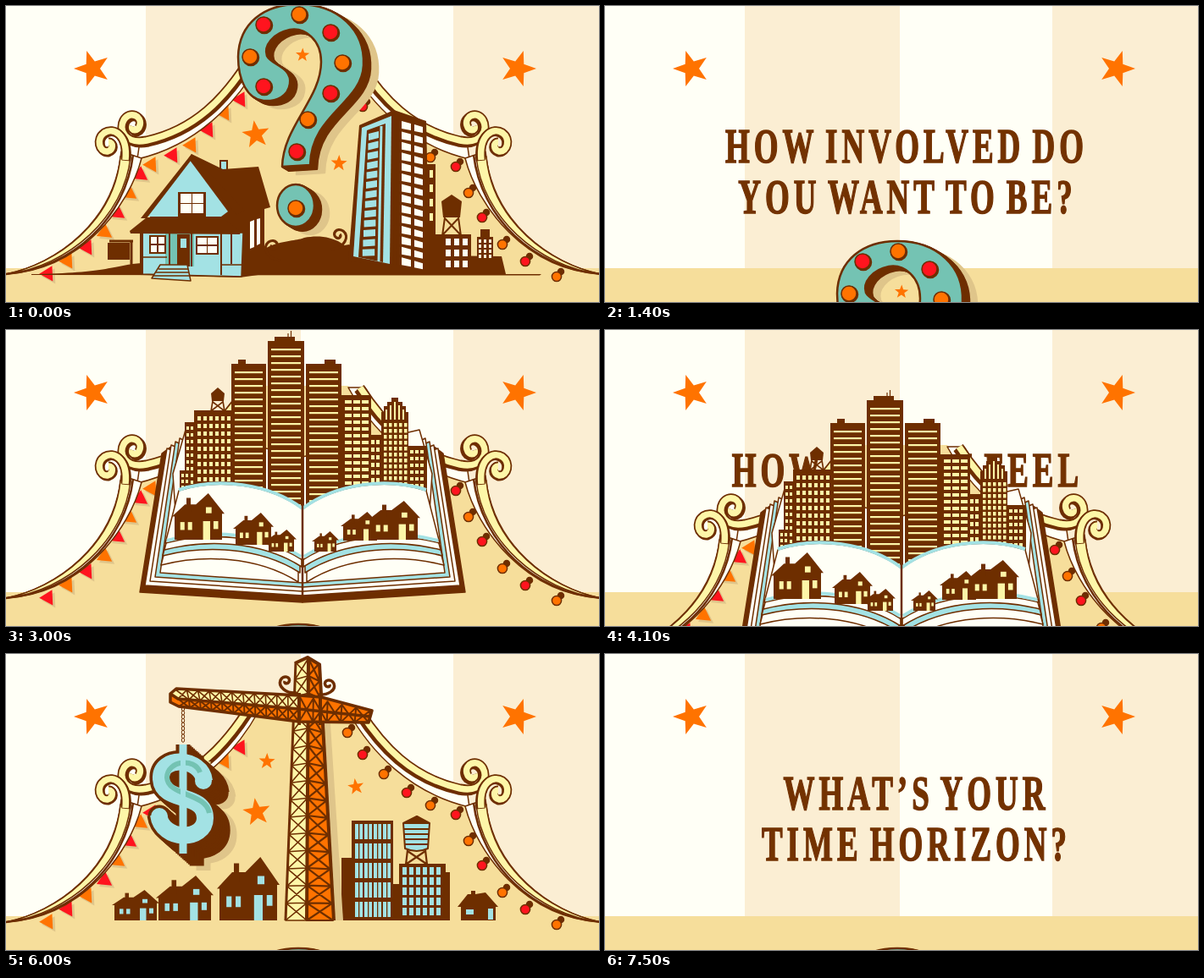
These frames come from a looping animation (700x350 px, 8 s). An HTML page:

```html
<!DOCTYPE html>
<html lang="en">
<head>
<meta charset="utf-8">
<title>Fairground questions</title>
<style>
html, body { margin: 0; width: 100%; height: 100%; overflow: hidden; background: #fffff6; }
svg { display: block; width: 100vw; height: 100vh; }
.scene, .ask { animation: 8s linear infinite; }
#house { animation-name: house; }
#book { animation-name: book; }
#crane { animation-name: crane; }
.ask { opacity: 0; animation-timing-function: step-end;
  font: bold 56px "Liberation Serif", "Noto Serif", serif;
  letter-spacing: 7.6px; word-spacing: -7.6px; text-anchor: middle;
  fill: #733200; stroke: #733200; stroke-width: 1.6; }
#ask1 { animation-name: ask1; }
#ask2 { animation-name: ask2; }
#ask3 { animation-name: ask3; }
/* Scenes drop and rise in hard 100 ms steps of 70 px */
@keyframes house {
  0%, 12.5% { transform: translateY(0); animation-timing-function: steps(5, end); }
  18.75%, 100% { transform: translateY(350px); }
}
@keyframes book {
  0%, 32.5% { transform: translateY(350px); animation-timing-function: steps(5, start); }
  38.75%, 51.25% { transform: translateY(0); animation-timing-function: steps(5, start); }
  57.5%, 100% { transform: translateY(350px); }
}
@keyframes crane {
  0%, 70% { transform: translateY(350px); animation-timing-function: steps(5, start); }
  76.25%, 88.75% { transform: translateY(0); animation-timing-function: steps(5, start); }
  95%, 100% { transform: translateY(350px); }
}
@keyframes ask1 { 0% { opacity: 0; } 13.75% { opacity: 1; } 37.5%, 100% { opacity: 0; } }
@keyframes ask2 { 0% { opacity: 0; } 51.25% { opacity: 1; } 75%, 100% { opacity: 0; } }
@keyframes ask3 { 0% { opacity: 0; } 88.75%, 100% { opacity: 1; } }
</style>
</head>
<body>
<svg id="stage" viewBox="0 0 700 350"></svg>
<script>
const BROWN = '#6e2e00', ORANGE = '#ff7300', RED = '#ff141e', SAND = '#f6de9b', SHADE = '#dfc58a',
      BLUE = '#a3e2e4', TEAL = '#74c3b3', WHITE = '#fffff6', YELLOW = '#fdf6a8', CREAM = '#fbeed3';

const path = (d, fill = BROWN, stroke = 'none', w = 1.5) =>
  `<path d="${d}" fill="${fill}" stroke="${stroke}" stroke-width="${w}" stroke-linejoin="round"/>`;
const line = (d, w = 1.5, c = BROWN) => path(d, 'none', c, w);
const poly = (pts, fill, stroke, w) => path('M' + pts + 'Z', fill, stroke, w);
const rect = (x, y, w, h, fill = BROWN) => `<rect x="${x}" y="${y}" width="${w}" height="${h}" fill="${fill}"/>`;
const disc = (x, y, r, fill = BROWN, ry = r) =>
  `<ellipse cx="${x}" cy="${y}" rx="${r}" ry="${ry}" fill="${fill}" stroke="${BROWN}" stroke-width="1.5"/>`;
const at = (x, y, body, more = '') => `<g transform="translate(${x} ${y}) ${more}">${body}</g>`;
const repeat = (n, fn) => Array.from({ length: n }, (_, i) => fn(i)).join('');
const grid = (x, y, cols, rows, dx, dy, w, h, fill) =>
  repeat(cols, c => repeat(rows, r => rect(x + c * dx, y + r * dy, w, h, fill)));

function star(x, y, r, turn = 180) {
  const pts = repeat(10, i => {
    const a = (turn + i * 36) * Math.PI / 180, k = i % 2 ? r * .41 : r;
    return `${(x + k * Math.cos(a)).toFixed(1)} ${(y + k * Math.sin(a)).toFixed(1)} `;
  });
  return poly(pts, ORANGE);
}

const extrude = (n, dx, dy, shape) =>
  repeat(n, i => at((n - i) * dx, (n - i) * dy, shape));

// Crossed bracing between the edges a-b and c-d
function truss(a, b, c, d, n, w = 1.6) {
  const mix = (p, q, t) => p.map((v, i) => (v + (q[i] - v) * t).toFixed(1)).join(' ');
  return line(repeat(n, i => {
    const s = i / n, t = (i + 1) / n;
    return `M${mix(a, b, s)}L${mix(c, d, t)}L${mix(a, b, t)}L${mix(c, d, s)}`;
  }), w);
}

const curl = (x, y, flip = 1) => at(x, y,
  line('M14 22C-2 20 -8 6 0 0C8 -5 14 4 8 8C4 10 2 6 4 4', 3.2), `scale(${flip} 1)`);

function tentSide() {
  const upper = 'M284 68C258 108 224 146 166 159C140 164 133 146 139 135C146 123 161 130 158 141C156 149 147 148 149 142';
  const lower = 'M141 182C144 152 127 143 116 150C106 157 110 173 120 172C127 170 127 161 121 161';
  return path('M158 160C215 150 255 108 278 68L298 68C272 115 225 165 155 181Z', WHITE, BROWN) +
    path('M0 317C60 305 128 255 136 172L160 180C146 235 90 312 0 317Z', WHITE, BROWN) +
    line('M0 317C80 310 141 250 150 176', 2.5) +
    path('M0 317C60 305 128 255 135 178L147 178C140 248 75 308 0 317Z', YELLOW, BROWN) +
    at(2, 2, line(upper, 11)) + line(upper, 11) + line(upper, 7.5, YELLOW) +
    at(1, 1, line(lower, 11)) + line(lower, 11) + line(lower, 7.5, YELLOW);
}

const flags = [277, 111, 258, 127, 239, 147, 219, 165, 197, 177, 172, 188, 159, 200,
  146, 222, 132, 245, 117, 268, 96, 286, 73, 302, 50, 317];
const lamps = [403, 93, 421, 119, 446, 142, 473, 164, 501, 179, 531, 190, 546, 221,
  562, 250, 586, 282, 613, 302, 650, 320];

function tent(first, flip) {
  let s = poly('20 317L0 317C90 312 146 235 156 178C225 165 272 115 298 66L404 66C430 115 477 165 546 178C556 235 612 312 702 317Z', SAND);
  s += repeat(flags.length / 2, i => {
    const turn = i > 5 && i < 10 ? -55 : -32, odd = flip && i > 3 ? 1 : 0;
    const tri = c => poly('-9 -6L9 -6L0 10', c);
    return at(flags[2 * i] + 3, flags[2 * i + 1] + 3, tri(SHADE), `rotate(${turn})`) +
      at(flags[2 * i], flags[2 * i + 1], tri((i + odd) % 2 ? ORANGE : RED), `rotate(${turn})`);
  });
  s += tentSide() + at(702, 0, tentSide(), 'scale(-1 1)');
  return s + repeat(lamps.length / 2, i => {
    if (i < first) return '';
    const x = lamps[2 * i], y = lamps[2 * i + 1];
    return disc(x + 5, y - 6, 3.5) + disc(x, y, 5.6, i % 2 ? RED : ORANGE);
  });
}

function questionMark() {
  const d = 'M326 190C327 142 372 110 372 66C372 40 353 25 335 28C315 32 304 47 308 59C313 70 338 72 335 92C333 107 319 113 304 112C285 110 274 88 274 60C275 20 305 -2 345 -2C392 -2 424 28 422 70C420 115 360 128 359 188Z';
  const shape = (c, w = 2.5) => path(d, c, c === SHADE ? c : BROWN, w) +
    `<ellipse cx="342" cy="236" rx="22" ry="25" fill="${c}" stroke="${c === SHADE ? c : BROWN}" stroke-width="${w}"/>`;
  const bulbs = [304, 95, 288, 60, 304, 22, 346, 10, 383, 31, 397, 67, 383, 103, 356, 134, 343, 172, 342, 239];
  return at(17, 9, shape(SHADE)) + extrude(8, 1, .6, shape(BROWN)) + shape(TEAL) +
    repeat(10, i => {
      const x = bulbs[2 * i], y = bulbs[2 * i + 1], c = i === 9 || i % 2 ? ORANGE : RED;
      return disc(x + 1, y + 1, 9.5) + disc(x, y, 9, c);
    });
}

function cottage() {
  return rect(253, 183, 8, 18, BLUE) + line('M252 183H262M253 184V200M261 184V200', 2) +
    poly('219 175L256 193L298 190L312 238L305 240L305 317L276 321L158 318L158 268L176 240Z') +
    poly('216 181L166 249L254 249L262 243Z', BLUE) + poly('219 175L159 251L166 251L218 183L272 247L282 242Z') +
    rect(203, 220, 33, 29) + grid(206, 222, 2, 2, 14, 12, 13, 11, WHITE) +
    poly('160 268L280 268L278 320L160 317Z', BLUE, BROWN) +
    rect(188, 268, 34, 40, TEAL) + poly('146 266L166 250L255 250L277 266L276 270L147 269Z') +
    rect(169, 271, 20, 22) + grid(171, 273, 2, 2, 9, 10, 7, 8, WHITE) +
    rect(202, 270, 15, 38) + rect(206, 275, 7, 11, BLUE) +
    rect(224, 272, 27, 22) + grid(226, 274, 2, 2, 12, 10, 11, 8, WHITE) +
    line('M161 268V317M193 268V308M219 268V308M254 268V318M266 268V305', 2) +
    line('M254 306H278M160 297H190', 1.3) +
    poly('182 306L214 306L218 325L172 322Z', BLUE, BROWN) + line('M180 311H215M177 315H216M174 319H217') +
    poly('288 255L293 253L293 285L288 287Z', WHITE) + poly('296 252L300 251L300 281L296 283Z', WHITE);
}

function officeBlock() {
  return poly('417 141L458 123L496 136L500 312L404 302Z') +
    poly('420 144L455 130L453 305L410 296Z', BLUE) +
    poly('426 147L448 139L445 303L416 297Z') +
    repeat(13, i => poly(`${428 - i * .6} ${151 + i * 11.4}L${440 - i * .4} ${148 + i * 11.6}v8L${428 - i * .6} ${159 + i * 11.4}Z`, BLUE)) +
    line('M443 142L440 302', 3, BLUE) +
    repeat(14, i => {
      const y = 136 + i * 12.4;
      return poly(`467 ${y}l11 3v8l-11 -2Z`, WHITE) + poly(`482 ${y + 4}l10 3v7l-10 -2Z`, WHITE);
    }) + line('M458 124L460 308', 4);
}

function houseScene() {
  return disc(350, 62, 42, SAND) + tent(1) +
    star(295, 152, 17, 190) + star(393, 186, 10, 200) + star(350, 58, 8.5, 200) + questionMark() +
    path('M30 317C120 316 130 306 160 304L290 300C310 282 350 292 405 282L420 294L585 296L590 317L632 317L630 318.5L30 318Z') +
    rect(120, 280, 26, 20) + line('M122 278H150M148 277V306', 3) +
    path('M290 317C290 275 340 280 352 274C380 268 405 280 410 298L410 317Z') +
    curl(310, 279) + curl(398, 266, -1) +
    cottage() + rect(496, 187, 11, 115) + officeBlock() +
    grid(500, 194, 1, 4, 8, 17, 4, 9, YELLOW) +
    rect(506, 270, 43, 47) + grid(519, 275, 3, 3, 10, 13, 6, 8, WHITE) +
    poly('514 231L526 223L538 231L536 250L516 250Z') + line('M518 250L515 272M534 250L537 272M518 251L536 270M534 251L516 270', 2) +
    rect(556, 273, 19, 40) + rect(560, 264, 11, 12) + grid(558, 276, 3, 4, 6, 6, 3, 4, CREAM);
}

// Small silhouette house; the gable sits over the right part
function cabin(x, y, w, h, lit = BLUE) {
  const g = w * .58;
  return at(x, y,
    poly(`0 ${h}V${h * .5}H-3L${w * .22} ${h * .24}H${w * .45}L${w - g / 2} 0L${w + 3} ${h * .44}H${w}V${h}Z`) +
    rect(w * .25, h * .1, w * .09, h * .3) +
    rect(w * .6, h * .6, w * .15, h * .4, lit) + rect(w * .82, h * .6, w * .1, h * .17, lit) +
    rect(w * .12, h * .62, w * .09, h * .17, lit) + rect(w * .28, h * .62, w * .09, h * .17, lit) +
    rect(w * .66, h * .3, w * .12, h * .13, lit));
}

const slab = (x, y, w, h) => rect(x, y, w, h) + grid(x + 4, y + 9, 1, Math.floor((h - 12) / 8), 0, 8, w - 8, 2.2, YELLOW);

function skyline() {
  return rect(211, 109, 14, 80) + grid(213, 114, 2, 9, 5, 8, 3, 4, YELLOW) +
    rect(205, 166, 12, 30) + grid(207, 170, 2, 3, 5, 7, 3, 4, YELLOW) +
    rect(222, 95, 46, 100) + grid(226, 102, 6, 10, 7, 9, 4, 5, YELLOW) +
    poly('242 75L250 68L258 75L257 84L243 84Z') + line('M244 84L242 96M256 84L258 96M244 85L257 95M256 85L243 95', 1.6) +
    slab(266, 40, 41, 190) + rect(274, 35, 9, 8) +
    slab(354, 40, 42, 190) + rect(376, 35, 13, 8) +
    slab(309, 13, 43, 210) + rect(317, 8, 24, 8) + line('M333 9V4M336.500 9V1', 1.2) +
    rect(396, 77, 35, 115) + grid(400, 83, 3, 13, 10, 8, 8, 4, YELLOW) +
    rect(429, 124, 16, 70) + grid(431, 130, 2, 7, 6, 9, 4, 5, YELLOW) +
    poly('443 195V97H446V90H450V85H455V80H463V85H468V90H472V97H475V195Z') + grid(446, 110, 5, 11, 6, 7, 3.5, 4.5, YELLOW) +
    line('M449 94V106M454 89V106M459 85V106M464 89V106M469 94V106', 2, YELLOW) +
    rect(474, 137, 23, 60) + grid(477, 142, 3, 6, 6, 8, 4, 4, YELLOW);
}

function bookHalf() {
  return poly('196 137L184 146L158 310L350 322L350 200Z', BROWN, BROWN) +
    repeat(4, i => poly(`${190 + i * 5} ${140 - i * 4}L${164 + i * 6} ${302 - i * 5}L350 ${314 - i * 5}L350 200Z`, i === 2 ? BLUE : WHITE, BROWN)) +
    poly('212 118L197 170L200 215L350 235L350 150Z', WHITE, BROWN);
}

function pageHalf() {
  const page = 'M204 190C250 175 310 182 350 212L350 272C300 240 235 240 188 252Z';
  return at(-5, 26, path(page, WHITE, BROWN)) + at(-3, 15, path(page, BLUE, BROWN)) +
    at(-1, 8, path(page, WHITE, BROWN)) + path(page, WHITE, BROWN) +
    line('M204 189C250 174 310 181 350 211', 4, BLUE) +
    line('M190 249C235 237 300 237 348 268', 4, BLUE);
}

function bookScene() {
  const mirror = s => s + at(700, 0, s, 'scale(-1 1)');
  return tent(4) + mirror(bookHalf()) + skyline() + mirror(pageHalf()) +
    line('M350 208V314', 2.5) +
    cabin(199, 193, 56, 55, YELLOW) + cabin(271, 216, 42, 38, YELLOW) + cabin(310, 236, 30, 26, YELLOW) +
    cabin(364, 238, 26, 24, YELLOW) + cabin(398, 215, 40, 34, YELLOW) + cabin(430, 202, 56, 46, YELLOW);
}

function dollar() {
  const s = 'M234 150C231 122 181 119 183 148C185 177 235 163 235 194C235 222 184 222 180 190';
  const mark = (c, w, bar) => line(s, w, c) + line('M209 107V236', bar, c) +
    `<circle cx="233" cy="150" r="${w * .5}" fill="${c}"/><circle cx="181" cy="192" r="${w * .5}" fill="${c}"/>`;
  return at(24, 20, mark(SHADE, 27, 17)) + extrude(9, 1.8, 1.6, mark(BROWN, 27, 17)) + mark(BROWN, 27, 17) +
    mark(BLUE, 20, 9) + line('M229 140C223 122 190 126 190 146C191 168 236 164 240 188', 6, TEAL) +
    line('M209 110V232', 6, BLUE);
}

function craneBody() {
  return at(10, 8, poly('345 60L372 60L388 307L372 307Z', SHADE)) +
    poly('342 8L357 3L355 315L329 315Z', YELLOW) + poly('357 3L370 11L387 315L355 315Z', ORANGE) +
    truss([342, 10], [330, 315], [357, 5], [355, 315], 15) +
    truss([357, 5], [355, 315], [369, 12], [386, 315], 15, 2.2) +
    line('M342 10L330 315', 3) + line('M357 4L355 315', 4) + line('M370 12L387 315', 4) +
    line('M341 11L356 4L371 13', 4) +
    poly('194 47L201 41L346 49L346 65L203 52Z', YELLOW) + poly('194 47L203 52L346 65L346 80L204 62L194 57Z', ORANGE) +
    poly('368 50L431 67L428 80L368 80Z', ORANGE) + poly('346 49L368 50L368 80L346 80Z', ORANGE) +
    truss([200, 42], [346, 49], [203, 53], [346, 65], 11) +
    truss([203, 53], [346, 65], [204, 62], [346, 80], 11, 2) +
    truss([346, 49], [430, 67], [346, 80], [428, 81], 5, 2) +
    line('M194 47L201 41L346 49L372 51L432 67L428 81L346 80L204 62L194 57ZM194 47L203 53L346 65L430 74', 3.5) +
    line('M346 46V84M371 48V84', 4) +
    at(327, 27, line('M16 19C4 20 -6 12 -3 4C0 -3 10 0 7 6C5 9 1 8 2 5', 3.5)) +
    at(384, 31, line('M16 17C4 18 -6 12 -3 4C0 -3 10 0 7 6C5 9 1 8 2 5', 3.5), 'scale(-1 1)') +
    repeat(9, i => `<ellipse cx="209" cy="${65 + i * 4.6}" rx="1.7" ry="2.5" fill="none" stroke="${BROWN}"/>`);
}

function craneScene() {
  return tent(0, true) + star(296, 187, 17, 190) + star(308, 127, 10, 200) + star(413, 157, 10, 190) +
    cabin(128, 279, 50, 36) + cabin(180, 262, 62, 53) + cabin(252, 240, 68, 75) +
    rect(396, 241, 14, 74) + rect(408, 197, 49, 118) +
    grid(412, 201, 4, 5, 11, 23, 9, 18, BLUE) + grid(416, 201, 4, 5, 11, 23, 1.3, 18, BROWN) +
    rect(456, 272, 12, 43) + rect(464, 248, 55, 67) + rect(517, 258, 7, 57) +
    grid(468, 252, 6, 5, 8, 12, 5, 9, BLUE) +
    path('M469 200L485 192L500 200L498 230Q485 236 471 230Z', BLUE, BROWN, 2) + poly('468 201L485 191L501 201Z') +
    line('M470 207H499M470 213H499M471 219H499M471 225H498', 2) +
    line('M474 232L472 249M495 232L497 249M474 233L496 248M495 233L473 248', 2.2) +
    poly('533 299L545 284L549 284V280H554V284L566 282L581 299H578V315H537V299Z') + rect(543, 302, 9, 6, BLUE) + rect(569, 301, 6, 13, BLUE) +
    craneBody() + dollar();
}

const words = (x, y, s) => `<text transform="translate(${x + 2.5} ${y}) scale(.66 1)">${s}</text>`;
const ask = (n, ...lines) => `<g class="ask" id="ask${n}">${lines.join('')}</g>`;
const scene = (id, body) => `<g class="scene" id="${id}">${body}</g>`;

document.getElementById('stage').innerHTML =
  rect(0, 0, 700, 350, WHITE) + rect(165, 0, 183, 350, CREAM) + rect(528, 0, 172, 350, CREAM) +
  rect(0, 310, 700, 40, SAND) + star(102, 74, 22, 180) + star(604, 74, 22, 0) +
  ask(1, words(353.5, 184.5, 'HOW INVOLVED DO'), words(354.5, 244.5, 'YOU WANT TO BE?')) +
  ask(2, words(354.5, 184.5, 'HOW DO YOU FEEL'), words(354.5, 244.5, 'ABOUT DEBT?')) +
  ask(3, words(365, 184, 'WHAT’S YOUR'), words(365, 244, 'TIME HORIZON?')) +
  scene('house', houseScene()) + scene('book', bookScene()) + scene('crane', craneScene());
</script>
</body>
</html>
```
